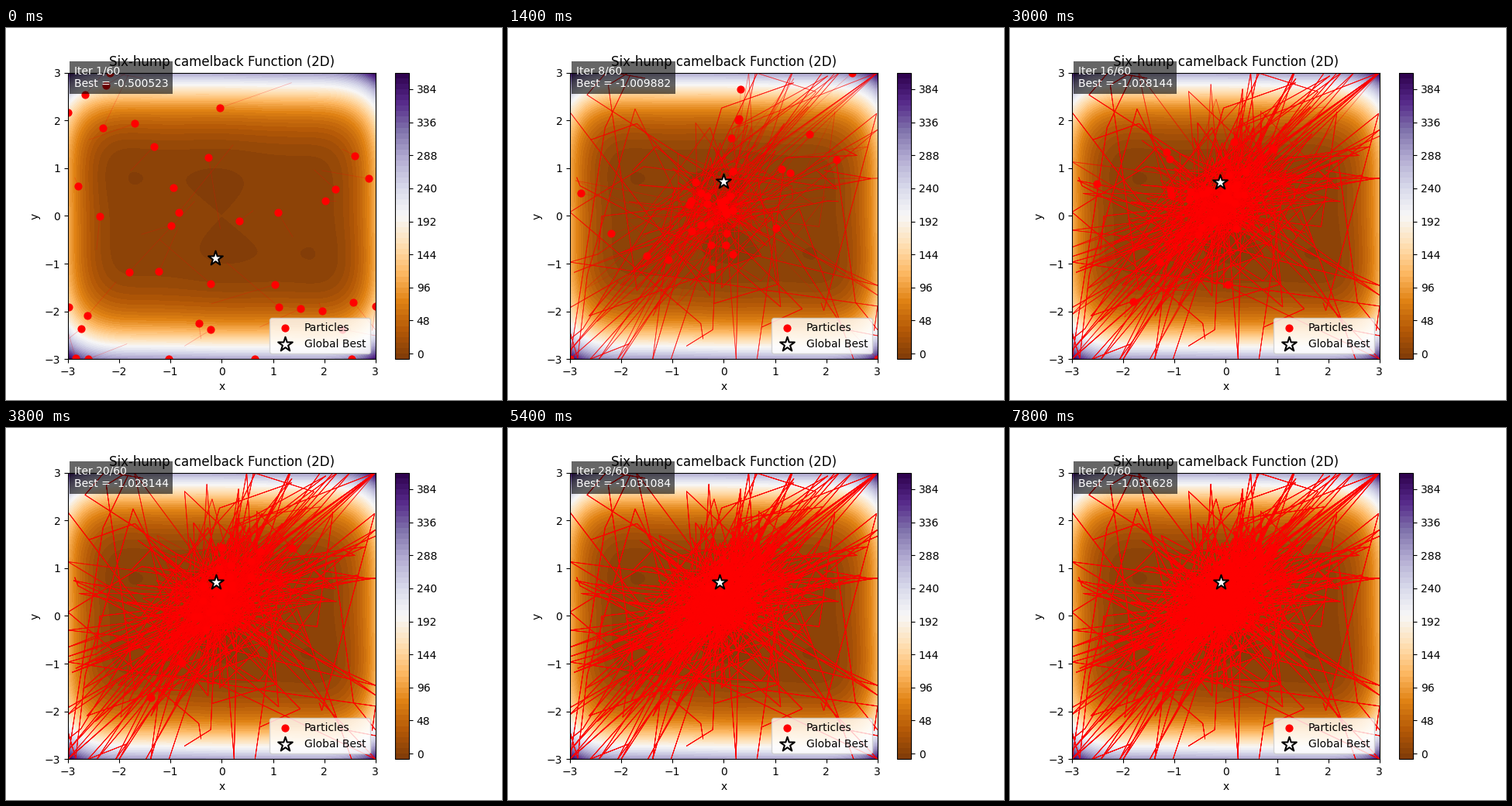
Recreate the animation shown at these times as a matplotlib script. Size 640x480 px, loop 8 s.

```python
import numpy as np
import matplotlib.pyplot as plt
from matplotlib.animation import FuncAnimation
from matplotlib.collections import LineCollection

STEPS, TOTAL, COUNT = 40, 60, 40
BOUND = 3
SETTLED = 29  # iteration by which the swarm has gathered
TRAIL_ALPHA, MAX_COPIES = 0.3, 8

# first iteration, star position, best value
BESTS = [
    (1, (-0.12, -0.88), -0.500523),
    (4, (-0.01, 0.72), -1.009882),
    (16, (-0.11, 0.70), -1.028144),
    (24, (-0.08, 0.70), -1.031084),
    (31, (-0.092, 0.712), -1.031606),
    (37, (-0.09, 0.7126), -1.031628),
]


def camelback(x, y):
    return (4 - 2.1 * x**2 + x**4 / 3) * x**2 + x * y + (4 * y**2 - 4) * y**2


def best_at(it):
    return [b for b in BESTS if b[0] <= it][-1]


def swarm():
    """Positions for every iteration, starting with the initial spread.

    Particles leap about a centre that drifts to the optimum. Most leaps stay
    near it, a few reach the walls, and the reach shrinks to almost nothing.
    """
    rng = np.random.default_rng(11)
    first = rng.uniform(-BOUND - 0.2, BOUND + 0.2, (COUNT, 2))
    path = [first + rng.normal(0, 0.7, (COUNT, 2)), first]
    goal = np.array(BESTS[-1][1])
    tilt = np.array([[1, 0.25], [0.25, 1]])
    for it in range(2, STEPS + 1):
        done = min(it / SETTLED, 1)
        reach = max(1.6 * (1 - done), 0.02)
        r = rng.exponential(reach, COUNT)
        a = rng.uniform(0, 2 * np.pi, COUNT)
        leap = np.column_stack([r * np.cos(a), r * np.sin(a)]) @ tilt
        path.append(goal * done + leap)
    return np.clip(path, -BOUND, BOUND)


path = swarm()
moves = np.stack([path[:-1], path[1:]], axis=2)

fig, ax = plt.subplots(figsize=(6.4, 4.8), dpi=100)
axis = np.linspace(-BOUND, BOUND, 200)
X, Y = np.meshgrid(axis, axis)
fig.colorbar(ax.contourf(X, Y, camelback(X, Y), levels=50, cmap="PuOr"), ax=ax)
ax.set(xlim=(-BOUND, BOUND), ylim=(-BOUND, BOUND), xlabel="x", ylabel="y",
       title="Six-hump camelback Function (2D)")

trails = LineCollection([], linewidths=0.5, zorder=2)
ax.add_collection(trails, autolim=False)
dots = ax.scatter([], [], s=40, c="red", zorder=2.4, label="Particles")
star = ax.scatter([], [], s=200, c="white", marker="*", edgecolors="black",
                  linewidths=1.5, zorder=4, label="Global Best")
ax.legend(loc="lower right")
info = ax.text(0.02, 0.95, "", transform=ax.transAxes, color="white",
               bbox=dict(facecolor="black", alpha=0.6, edgecolor="none"))


def update(i):
    # Each move is painted again every iteration, so old trails turn solid.
    segs, colors = [], []
    for k in range(i + 1):
        age = i - k + 1
        copies = min(age, MAX_COPIES)
        alpha = 1 - (1 - TRAIL_ALPHA) ** (age / copies)
        segs.extend(np.tile(moves[k], (copies, 1, 1)))
        colors += [(1, 0, 0, alpha)] * (copies * COUNT)
    trails.set_segments(segs)
    trails.set_color(colors)
    dots.set_offsets(path[i + 1])
    _, spot, value = best_at(i + 1)
    star.set_offsets([spot])
    info.set_text(f"Iter {i + 1}/{TOTAL}\nBest = {value:.6f}")
    return trails, dots, star, info


anim = FuncAnimation(fig, update, frames=STEPS, interval=200, repeat=True,
                     repeat_delay=0, blit=False)
plt.show()
```
